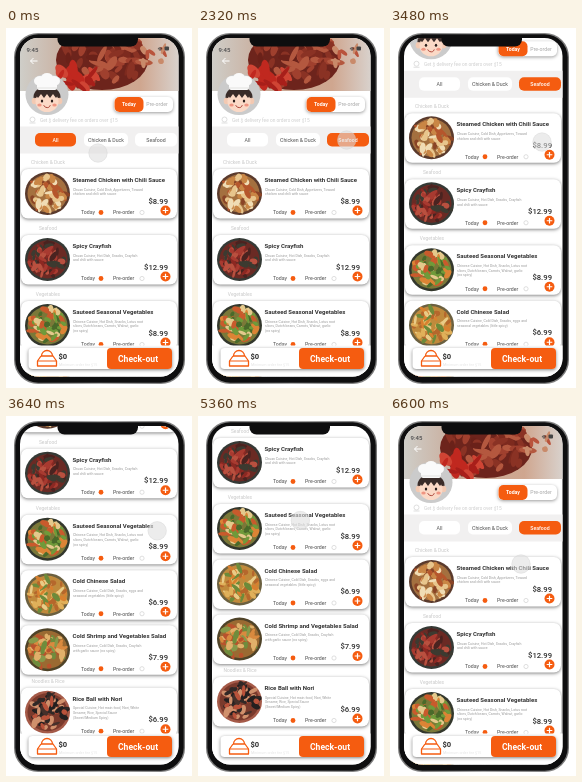
Animation, 186 px wide and 360 px high, one loop 6.64 s. Source, as an HTML page with a canvas:

```html
<!DOCTYPE html>
<html lang="en">
<head>
<meta charset="utf-8">
<title>Food ordering app</title>
<style>
html, body { margin: 0; width: 100%; height: 100%; overflow: hidden; background: #fff; }
canvas { display: block; width: 186px; height: 360px; }
</style>
</head>
<body>
<canvas id="stage"></canvas>
<script>
const W = 186, H = 360, LOOP = 6640;
const ORANGE = '#f55c10', INK = '#303030', PALE = '#c9c9c9';
const canvas = document.getElementById('stage');
const ctx = canvas.getContext('2d');
const dpr = window.devicePixelRatio || 1;
canvas.width = W * dpr;
canvas.height = H * dpr;

const ease = {
  line: p => p,
  out: p => 1 - (1 - p) ** 2,
  both: p => p * p * (3 - 2 * p)
};

// Each key: time, values..., easing used to reach it
const SCROLL = [
  [0, 0], [3400, 0], [3480, 55, 'line'], [3640, 174, 'line'], [3720, 185, 'out'],
  [5840, 185], [5920, 170, 'line'], [6040, 146, 'line'], [6440, 0, 'out'], [LOOP, 0]
];
const TOUCH = [
  [0, 92, 125], [400, 98, 113], [1400, 99, 112], [1920, 148, 112], [2560, 149, 112],
  [3200, 152, 168], [3400, 152, 170], [3480, 152, 114, 'line'], [3700, 151, 115],
  [4560, 85, 98], [5200, 100, 104], [5840, 115, 107], [5920, 115, 122, 'line'],
  [6040, 117, 146, 'line'], [6300, 131, 149], [LOOP, 131, 148]
];
const TAB_TAPS = [480, 2000];

const DISHES = [
  { y: 152, label: 'Chicken & Duck', name: 'Steamed Chicken with Chili Sauce', price: '$8.99',
    text: ['Chuan Cuisine, Cold Dish, Appetizers, Toward', 'chicken and chili with sauce'],
    base: '#a4703f', rim: '#5a3a2c', bits: ['#e8c58c', '#f0dcb4', '#c98645', '#8a4426', '#b5562c'] },
  { y: 218, label: 'Seafood', name: 'Spicy Crayfish', price: '$12.99',
    text: ['Chuan Cuisine, Hot Dish, Snacks, Crayfish', 'and chili with sauce'],
    base: '#6a2a24', rim: '#353a36', bits: ['#a83a30', '#8c2822', '#4a2320', '#b9503f', '#3c3a30'] },
  { y: 284, label: 'Vegetables', name: 'Sauteed Seasonal Vegetables', price: '$8.99',
    text: ['Chinese Cuisine, Hot Dish, Snacks, Lotus root', 'slices, Dutch beans, Carrots, Walnut, garlic', '(no spicy)'],
    base: '#7a7838', rim: '#33372c', bits: ['#dc8435', '#6f9a3a', '#e4c98c', '#4a6a2a', '#c95a2c'] },
  { y: 339.5, name: 'Cold Chinese Salad', price: '$6.99',
    text: ['Chinese Cuisine, Cold Dish, Snacks, eggs and', 'seasonal vegetables (little spicy)'],
    base: '#c08a3c', rim: '#6b6040', bits: ['#e0b05a', '#d8802f', '#6d8a3a', '#e9cb86', '#b5672c'] },
  { y: 394.5, name: 'Cold Shrimp and Vegetables Salad', price: '$7.99',
    text: ['Chinese Cuisine, Cold Dish, Snacks, Crayfish', 'with garlic sauce (no spicy)'],
    base: '#9a6a32', rim: '#4f4328', bits: ['#d98a3f', '#6f8c3c', '#e0b06a', '#b9522c', '#86994a'] },
  { y: 457, label: 'Noodles & Rice', name: 'Rice Ball with Nori', price: '$6.99',
    text: ['Special Cuisine, Hot main food, Nori, White', 'Sesame, Rice, Special Sauce', '(Sweet/Medium Spicy)'],
    base: '#7a3a2c', rim: '#a55a48', bits: ['#302826', '#46302a', '#d0906c', '#b9523a', '#241f1f'] }
];
const TABS = [['All', 29, 41], ['Chicken & Duck', 78, 44], ['Seafood', 129, 42]];

function sample(keys, t) {
  let i = 1;
  while (i < keys.length - 1 && t > keys[i][0]) i++;
  const a = keys[i - 1], b = keys[i];
  const last = b[b.length - 1];
  const curve = ease[typeof last === 'string' ? last : 'both'];
  const p = curve(Math.min(1, (t - a[0]) / (b[0] - a[0])));
  return [1, 2].map(k => a[k] + (b[k] - a[k]) * p);
}

function random(seed) {
  return () => (seed = (seed * 16807) % 2147483647) / 2147483647;
}

function box(x, y, w, h, r, fill, shadow) {
  ctx.save();
  if (shadow) {
    ctx.shadowColor = 'rgba(0,0,0,' + shadow + ')';
    ctx.shadowBlur = 3.5 * dpr;
    ctx.shadowOffsetY = dpr;
  }
  ctx.fillStyle = fill;
  ctx.beginPath();
  ctx.roundRect(x, y, w, h, r);
  ctx.fill();
  ctx.restore();
}

function oval(x, y, rx, ry, fill, angle = 0) {
  ctx.fillStyle = fill;
  ctx.beginPath();
  ctx.ellipse(x, y, rx, ry, angle, 0, Math.PI * 2);
  ctx.fill();
}

function arc(x, y, r, from, to, color, width) {
  ctx.strokeStyle = color;
  ctx.lineWidth = width;
  ctx.beginPath();
  ctx.arc(x, y, r, from, to);
  ctx.stroke();
}

const ring = (x, y, r, color, width) => arc(x, y, r, 0, Math.PI * 2, color, width);

function line(color, width, ...points) {
  ctx.strokeStyle = color;
  ctx.lineWidth = width;
  ctx.beginPath();
  points.forEach(([x, y]) => ctx.lineTo(x, y));
  ctx.stroke();
}

function label(str, x, y, size, color, weight = 400, align = 'left') {
  ctx.font = `${weight} ${size}px Roboto, sans-serif`;
  ctx.textAlign = align;
  ctx.textBaseline = 'alphabetic';
  ctx.fillStyle = color;
  ctx.fillText(str, x, y + size * 0.355);
}

function scatter(x, y, rx, ry, count, colors, size, seed) {
  const rnd = random(seed);
  for (let i = 0; i < count; i++) {
    const a = rnd() * Math.PI * 2, d = Math.sqrt(rnd());
    oval(x + Math.cos(a) * d * rx, y + Math.sin(a) * d * ry,
      size * (0.5 + rnd() * 0.7), size * (0.25 + rnd() * 0.35),
      colors[Math.floor(rnd() * colors.length)], rnd() * 3);
  }
}

function hero() {
  ctx.save();
  ctx.beginPath();
  ctx.rect(12, 6, 163, 57);
  ctx.clip();
  const g = ctx.createLinearGradient(12, 0, 175, 0);
  g.addColorStop(0, '#cfcfca');
  g.addColorStop(0.35, '#c9aa98');
  g.addColorStop(0.75, '#cfa68f');
  g.addColorStop(1, '#d9d4d0');
  ctx.fillStyle = g;
  ctx.fillRect(12, 6, 163, 57);
  oval(96, 32, 46, 30, '#6d241c');
  scatter(97, 31, 43, 27, 60, ['#8a3224', '#a0402e', '#6a2119', '#7d2a1e', '#b4583f'], 8, 97);
  scatter(70, 50, 22, 10, 16, ['#c0281f', '#a81f1a', '#d04434'], 8, 41);
  scatter(145, 24, 14, 14, 8, ['#c98a6a', '#b9533c', '#e0cfc0'], 5, 29);
  ctx.restore();
  label('9:45', 20.5, 21.5, 6, '#4a4a4c', 500);
  for (let i = 0; i < 3; i++) arc(154, 23, 0.8 + i * 1.2, -2.3, -0.8, '#333', 0.8);
  box(158.5, 18.5, 4.5, 4, 1, '#444');
  line('#fff', 1, [31.5, 33], [24.5, 33]);
  line('#fff', 1, [27.5, 30], [24.5, 33], [27.5, 36]);
}

function chef() {
  ctx.save();
  ctx.translate(41, 0);
  oval(0, 66.5, 21.5, 20.5, '#cbcbcb');
  oval(0, 69, 13.5, 10.5, '#3a2c29');
  for (const s of [-1, 1]) oval(s * 12.5, 73, 2.8, 3.3, '#f3c9b2');
  oval(0, 73.5, 11.5, 10.5, '#fbd9c6');
  ctx.fillStyle = '#3a2c29';
  ctx.beginPath();
  ctx.moveTo(-13, 71);
  for (let i = 0; i <= 8; i++) ctx.lineTo(-12 + i * 3, i % 2 ? 70 : 66);
  ctx.lineTo(13, 71);
  ctx.lineTo(9, 60);
  ctx.lineTo(-9, 60);
  ctx.fill();
  for (const x of [-7, 0, 7]) oval(x, x ? 53 : 50, 6, 5, '#fafafa');
  box(-10, 53, 20, 9, 2, '#fafafa');
  line('#d2d0ce', 0.6, [-10, 60], [10, 60]);
  for (const s of [-1, 1]) {
    oval(s * 5, 73, 1.2, 1.6, '#2d201d');
    oval(s * 7.5, 77, 2.2, 1.5, '#ef9582');
  }
  arc(0, 76, 3.5, 0.35, Math.PI - 0.35, '#a3352a', 0.9);
  ctx.restore();
}

function header(tab) {
  hero();
  chef();
  box(108, 69, 59, 15, 5, '#fff', 0.4);
  box(108.5, 69, 29, 15, 5, ORANGE);
  label('Today', 123, 76.5, 5.2, '#fff', 700, 'center');
  label('Pre-order', 151, 76.5, 5.2, '#a8a8a8', 400, 'center');
  ring(26.5, 91.5, 2.5, '#d2d2d2', 0.7);
  line('#d2d2d2', 0.7, [23.5, 95], [29.5, 95]);
  label('Get $ delivery fee on orders over $15', 34, 92.5, 4.8, '#cecece');
  ctx.fillStyle = '#f1f0f0';
  ctx.fillRect(12, 98.5, 163, 27);
  TABS.forEach(([name, x, w], i) => {
    const on = i === tab;
    box(x, 105, w, 13.5, 5, on ? ORANGE : '#fff');
    label(name, x + w / 2, 112, 5.2, on ? '#fff' : '#505050', on ? 500 : 400, 'center');
  });
}

function dish(d, i) {
  const y = d.y, cy = y + 13.5;
  if (d.label) label(d.label, 42, y - 17.5, 4.9, PALE, 400, 'center');
  box(15, y - 11, 156, 49.5, 7, '#fff', 0.5);
  ctx.save();
  ctx.beginPath();
  ctx.ellipse(41.5, cy, 22.5, 21.5, 0, 0, Math.PI * 2);
  ctx.clip();
  ctx.fillStyle = d.rim;
  ctx.fillRect(18, y - 9, 47, 47);
  oval(41.5, cy, 20, 19, d.base);
  scatter(41.5, cy, 18, 17, 60, d.bits, 5, 311 + i * 77);
  ctx.restore();
  label(d.name, 66.5, y, 6.05, INK, 700);
  d.text.forEach((s, k) => label(s, 67, y + 9.5 + k * 4.7, 3.5, '#999'));
  label(d.price, 162, y + 21, 7.7, INK, 500, 'right');
  label('Today', 75, y + 32.5, 5.2, '#4c4c4c');
  oval(95, y + 32.5, 2.4, 2.4, ORANGE);
  label('Pre-order', 107, y + 32.5, 5.2, '#4c4c4c');
  ring(136, y + 32.5, 2.1, '#d2d2d2', 0.7);
  oval(159.5, y + 30.5, 5, 5, ORANGE);
  line('#fff', 1.2, [156.7, y + 30.5], [162.3, y + 30.5]);
  line('#fff', 1.2, [159.5, y + 27.7], [159.5, y + 33.3]);
}

function basket() {
  ctx.lineJoin = 'round';
  arc(41, 328, 5.5, Math.PI, 0, ORANGE, 1.3);
  line(ORANGE, 1.3, [35, 328], [47, 328], [50.5, 333], [50.5, 338], [31.5, 338], [31.5, 333], [35, 328]);
  line(ORANGE, 1.2, [31.5, 333], [50.5, 333]);
}

function footer() {
  ctx.fillStyle = '#fff';
  ctx.fillRect(12, 317.5, 163, 34);
  box(22.5, 320, 143.5, 21, 4, '#fff', 0.5);
  box(101, 320, 65, 21, 4, ORANGE);
  label('Check-out', 132, 331, 8.6, '#fff', 700, 'center');
  basket();
  label('$0', 52.5, 328, 7.6, INK, 700);
  label('Minimum order fee $15', 53, 336.5, 3.7, '#e4e4e4');
}

function phone() {
  const g = ctx.createLinearGradient(8, 0, 179, 0);
  g.addColorStop(0, '#777');
  g.addColorStop(0.5, '#aaa');
  g.addColorStop(1, '#777');
  box(8, 5, 171, 351, 24, g);
  box(9.3, 6.3, 168.4, 348.4, 23, '#0e0e0f');
}

function render(t) {
  const [scroll] = sample(SCROLL, t);
  const [tx, ty] = sample(TOUCH, t);
  const tab = TAB_TAPS.filter(tap => t >= tap).length;

  ctx.setTransform(dpr, 0, 0, dpr, 0, 0);
  ctx.fillStyle = '#fff';
  ctx.fillRect(0, 0, W, H);
  phone();

  ctx.save();
  ctx.beginPath();
  ctx.roundRect(14, 10, 158.5, 338.5, 18);
  ctx.clip();
  ctx.fillStyle = '#fff';
  ctx.fillRect(0, 0, W, H);
  ctx.save();
  ctx.translate(0, -scroll);
  header(tab);
  DISHES.forEach(dish);
  ctx.restore();
  footer();
  oval(tx, ty, 9.5, 9.5, 'rgba(222,222,222,.58)');
  ring(tx, ty, 9.2, 'rgba(190,190,190,.28)', 0.7);
  ctx.restore();

  box(51.5, 8, 80.5, 10.5, [0, 0, 7, 7], '#0e0e0f');
}

const start = performance.now();
function tick() {
  render((performance.now() - start) % LOOP);
  requestAnimationFrame(tick);
}
tick();
</script>
</body>
</html>
```
